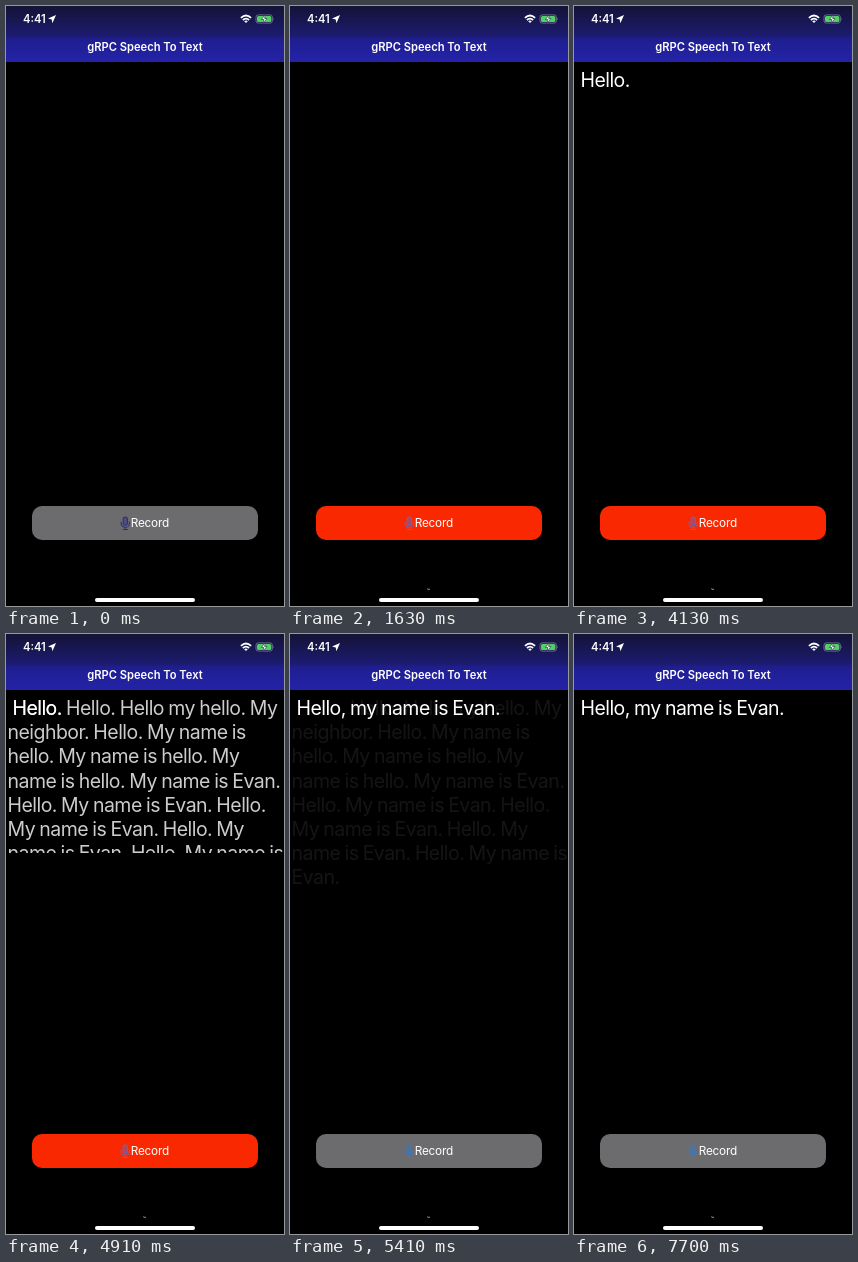
An HTML page for the animation above (8000 ms loop, 278 px wide and 600 px high).

```html
<!DOCTYPE html>
<html lang="en">
<head>
<meta charset="utf-8">
<title>Speech To Text</title>
<style>
  html, body { margin: 0; width: 100%; height: 100%; overflow: hidden; background: #000; }
  #stage {
    position: relative; width: 278px; height: 600px; overflow: hidden;
    background: #000; color: #fff;
    font-family: Inter, Roboto, "Liberation Sans", sans-serif;
    font-optical-sizing: none;
  }
  #stage > * { position: absolute; }
  .loop { animation: 8s step-end infinite; }

  .bar {
    left: 0; top: 0; width: 278px; height: 55.5px;
    background: linear-gradient(#141336, #1c1b70 30px, #1f1e90 33px, #2423a8 56px);
  }
  .clock, .title { font-size: 11.15px; font-weight: 600; line-height: 14px; white-space: pre; }
  .clock { left: 17px; top: 6px; }
  .title { left: 0; top: 34px; width: 278px; text-align: center; }
  .icons { left: 0; top: 0; }

  .speech {
    left: 1.5px; top: 61.9px; white-space: pre;
    font-size: 19.5px; line-height: 24.2px;
    letter-spacing: -.54px; word-spacing: -.7px;
    opacity: 0;
  }
  .speech b { font-weight: 400; color: #fff; }
  .draft { color: #e6e6e6; animation-name: draft; }
  .first { animation-name: first; }
  .long { animation-name: long; }
  .final { animation-name: final; }

  .button {
    left: 25.6px; top: 499.7px; width: 226.6px; height: 34px; border-radius: 10px;
    background: #6c6b6e; animation-name: button;
  }
  .label { left: 124.7px; top: 509px; font-size: 11.8px; line-height: 16px; letter-spacing: -.2px; }
  .mic { left: 113px; top: 510px; color: #2d2f83; animation-name: mic; }
  .tick { left: 137px; top: 582px; opacity: 0; animation-name: tick; }
  .home { left: 88.5px; top: 592.4px; width: 100.5px; height: 3.5px; border-radius: 2px; background: #fff; }

  @keyframes tick { 0% { opacity: 0 } 6.625%, 100% { opacity: 1 } }
  @keyframes button {
    0% { background: #6c6b6e }
    13.25% { background: #8f5a52 }
    14.125% { background: #b24a37 }
    15% { background: #d5391b }
    15.875% { background: #f92800 }
    65.875% { background: #ca3e25 }
    66.75% { background: #8f5a50 }
    67.625%, 100% { background: #6c6b6e }
  }
  @keyframes mic {
    0% { color: #2d2f83 }
    14.125% { color: #4450a8 }
    15.875% { color: #5a6bcb }
    66.75% { color: #4473cc }
    67.625%, 100% { color: #2f7bd0 }
  }
  @keyframes draft {
    0% { opacity: 0 }
    35.5% { opacity: 1 }
    36.375%, 100% { opacity: 0 }
  }
  @keyframes first {
    0% { opacity: 0 }
    36.375% { opacity: 1 }
    63.25%, 100% { opacity: 0 }
  }
  @keyframes long {
    0% { opacity: 0; clip-path: inset(0 0 108px) }
    60.5% { opacity: .4; clip-path: inset(0 0 84px) }
    61.375% { opacity: .8; clip-path: inset(0 0 37.5px) }
    62.25% { opacity: .92; clip-path: inset(0 0 14px) }
    63.25% { opacity: .98; clip-path: inset(0 0 3px) }
    64.125% { opacity: 1; clip-path: inset(0) }
    65.875% { opacity: .7; clip-path: inset(0) }
    66.75% { opacity: .33; clip-path: inset(0) }
    67.625% { opacity: .08; clip-path: inset(0) }
    68.5%, 100% { opacity: 0; clip-path: inset(0) }
  }
  @keyframes final {
    0% { opacity: 0 }
    65.875% { opacity: .35 }
    66.75% { opacity: .75 }
    67.625%, 100% { opacity: 1 }
  }
</style>
</head>
<body>
<div id="stage">
  <div class="bar"></div>
  <div class="clock">4:41</div>
  <div class="title">gRPC Speech To Text</div>

  <svg class="icons" width="278" height="30">
    <path d="M50 9 L46.4 17.2 L45.7 13.4 L42 12.6 Z" fill="#fff"/>
    <g fill="none" stroke="#fff" stroke-width="1.8">
      <path d="M234.9 11.9 Q240 7.2 245.1 11.9"/>
      <path d="M236.9 14 Q240 11.2 243.1 14"/>
    </g>
    <path d="M238.2 15.2 Q240 13.8 241.8 15.2 L240 17.1 Z" fill="#fff"/>
    <rect x="250" y="8.9" width="16.4" height="8.2" rx="2.3" fill="none" stroke="#8b8ba0" stroke-width=".7"/>
    <rect x="251" y="9.9" width="14.4" height="6.2" rx="1.5" fill="#4fd263"/>
    <path d="M267.2 11.7 q1.2 1.3 0 2.6 Z" fill="#8b8ba0"/>
    <path d="M259.4 8.4 L255.4 13.5 H257.8 L257 17.6 L261 12.4 H258.6 Z" fill="#fff" stroke="#1b1b50" stroke-width=".6"/>
  </svg>

  <div class="speech loop draft"><b>Hello.</b> Hello. Hello hello hello.
Hello.</div>
  <div class="speech loop long"> Hello. Hello. Hello my hello. My
neighbor. Hello. My name is
hello. My name is hello. My
name is hello. My name is Evan.
Hello. My name is Evan. Hello.
My name is Evan. Hello. My
name is Evan. Hello. My name is
Evan.</div>
  <div class="speech loop first"> Hello.</div>
  <div class="speech loop final"> Hello, my name is Evan.</div>

  <div class="button loop"></div>
  <svg class="mic loop" width="12" height="15" fill="none" stroke="currentColor" stroke-width="1.1">
    <rect x="4.2" y="1" width="4.2" height="8.2" rx="2.1" fill="currentColor" fill-opacity=".45"/>
    <path d="M2.2 5.8 V7.4 A4.1 4 0 0 0 10.4 7.4 V5.8 M6.3 11.4 V13.4 M3.7 13.5 H8.9"/>
  </svg>
  <div class="label">Record</div>

  <svg class="tick loop" width="4" height="4">
    <path d="M.3 .7 L1.2 1.5 L2 .9 L2.8 1.5" fill="none" stroke="#ddd" stroke-width=".8"/>
  </svg>
  <div class="home"></div>
</div>
</body>
</html>
```
